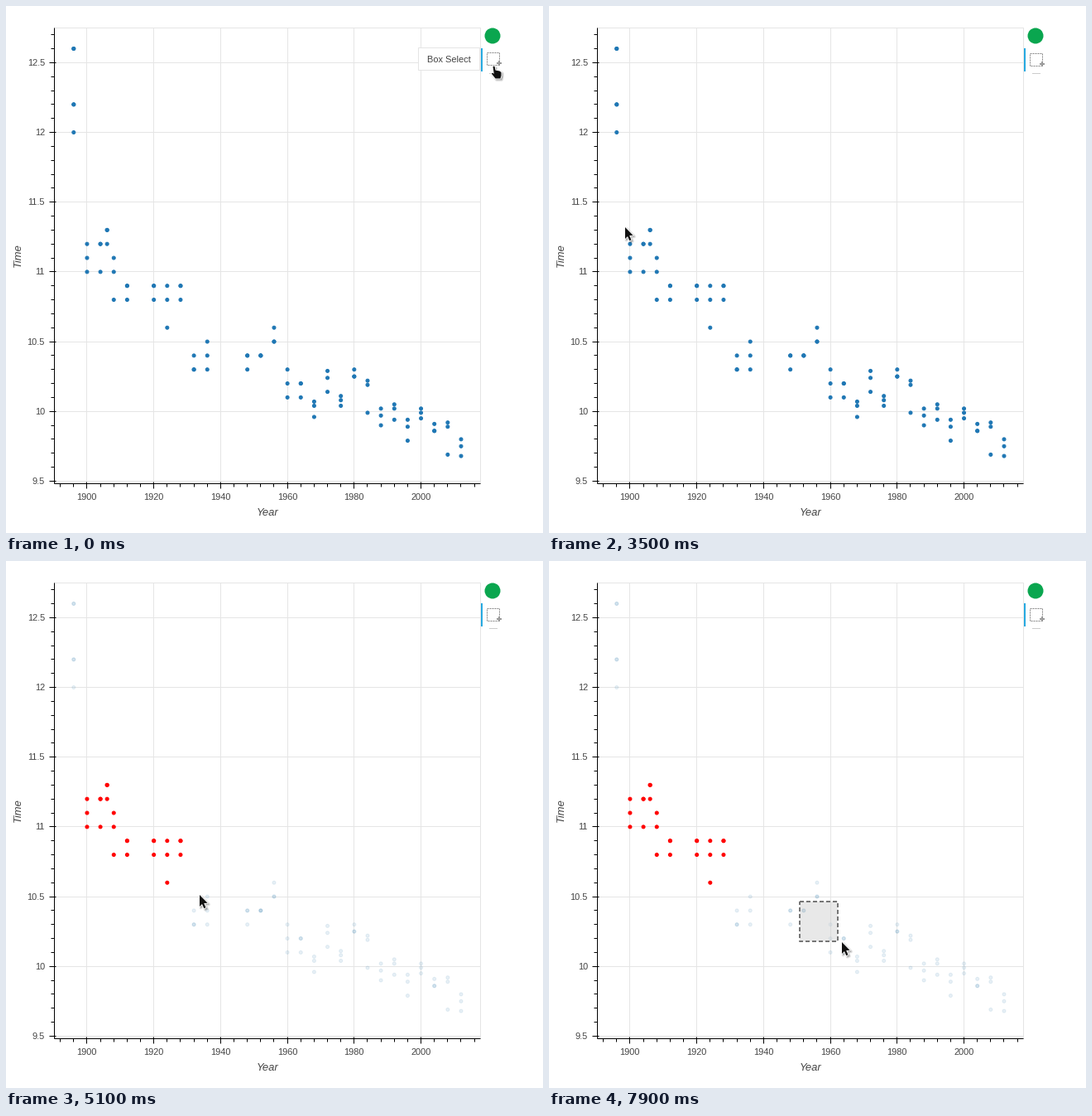
A matplotlib script for the animation above (8 s loop, 649 by 636 pixels).

```python
from itertools import cycle

import numpy as np
import matplotlib.pyplot as plt
from matplotlib.animation import FuncAnimation
from matplotlib.patches import Circle, Polygon, Rectangle

W, H, DPI = 649, 636, 64
PX = 72 / DPI  # points per pixel
LEFT, RIGHT, TOP, BOTTOM = 58.5, 573.5, 26.5, 576.5
INK, GRID, BLUE = "#444444", "#e5e5e5", "#1f77b4"

plt.rcParams["font.family"] = "Liberation Sans"
plt.rcParams["path.snap"] = False
fig = plt.figure(figsize=(W / DPI, H / DPI), dpi=DPI, facecolor="white")
ax = fig.add_axes([0, 0, 1, 1])
ax.set(xlim=(0, W), ylim=(H, 0))
ax.axis("off")


def year_x(year):
    return 58.4 + (year - 1890.2) * 515 / 127.6


def time_y(time):
    return TOP + (12.7485 - time) * 550 / 3.267


def crisp(v):
    return np.floor(v) + 0.5


def line(x0, y0, x1, y1, color="black", z=3, width=1):
    return ax.plot([x0, x1], [y0, y1], color=color, lw=width * PX, zorder=z,
                   solid_capstyle="butt")[0]


def dashed(color, width, z, on, off):
    return ax.plot([], [], color=color, lw=width * PX, zorder=z,
                   dashes=(on / width, off / width), dash_capstyle="butt")[0]


def label(x, y, text, size=11, **kw):
    kw = {"ha": "center", "va": "baseline", "color": INK, "zorder": 6, **kw}
    return ax.text(x, y, text, fontsize=size * PX, **kw)


def box(x0, y0, x1, y1, z, **kw):
    return ax.add_patch(Rectangle((x0, y0), x1 - x0, y1 - y0, zorder=z, **kw))


# Plot frame, grid, ticks and labels
box(LEFT, TOP, RIGHT, BOTTOM, 1, fc="white", ec=GRID, lw=PX)
for year in range(1892, 2017, 4):
    x = crisp(year_x(year))
    if year % 20:
        line(x, BOTTOM, x, BOTTOM + 4)
    else:
        line(x, TOP, x, BOTTOM, GRID, 1)
        line(x, BOTTOM - 2, x, BOTTOM + 6)
        label(x, 596, str(year))
for tenth in range(95, 128):
    y = crisp(time_y(tenth / 10))
    if tenth % 5:
        line(LEFT - 4, y, LEFT, y)
    else:
        line(LEFT, y, RIGHT, y, GRID, 1)
        line(LEFT - 6, y, LEFT + 2, y)
        label(47, y + 3.5, f"{tenth / 10:g}", ha="right")
line(LEFT, TOP, LEFT, BOTTOM)
line(LEFT, BOTTOM, RIGHT, BOTTOM)
label(316, 615, "Year", 13, style="italic")
label(15, 301, "Time", 13, style="italic", rotation=90, va="center")


def podiums():
    """Three times per games: second place, and gaps that repeat by era."""
    games = [y for y in range(1896, 2013, 4) if y not in (1916, 1940, 1944)]
    games = sorted(games + [1906])
    seconds = [12.2, 11.1, 11.2, 11.3, 11, 10.9, 10.9, 10.8, 10.9, 10.3,
               10.4, 10.4, 10.4, 10.5, 10.2, 10.2, 10.04, 10.24, 10.08, 10.25,
               10.19, 9.97, 10.02, 9.89, 9.99, 9.86, 9.89, 9.75]
    early = cycle([.2, .1, .2, .1, .2, .1, .1]), cycle([0, .1, 0])
    middle = cycle([0, .1, .1, 0]), cycle([.1, .1, 0, 0])
    late = cycle([.08, .1, .04, 0, .2, .07]), cycle([.03, .05])
    rows = [(1896, 12.6)] * 2
    for year, second in zip(games, seconds):
        lead, trail = early if year < 1930 else middle if year < 1966 else late
        rows += [(year, second - next(lead)), (year, second),
                 (year, second + next(trail))]
    return np.array(rows).T


years, times = podiums()
chosen = (years >= 1900) & (years <= 1928)
points = ax.scatter(year_x(years), time_y(times), s=(4 * PX) ** 2,
                    c=BLUE, edgecolors=BLUE, linewidths=PX, zorder=2)
plain_colors = [BLUE] * len(years)
picked_colors = [(1, 0, 0, 1) if c else (0.12, 0.45, 0.66, 0.1) for c in chosen]

# Toolbar
ax.add_patch(Circle((588, 36), 9.5, fc="#0aa64f", lw=0, zorder=4))
bar = box(574, 51, 576, 79, 4, fc="#26aae1", lw=0)
line(584, 81.5, 594, 81.5, "#cccccc", 4)
icon = dashed("#888888", 1, 4, 2, 1)
plus = [line(0, 0, 0, 0, "#999999", 4, 2) for _ in range(2)]
tooltip = [box(498.5, 50.5, 572.5, 77.5, 5, fc="white", ec=GRID, lw=PX),
           label(535.5, 68, "Box Select")]

# Selection rectangle
fill = box(0, 0, 1, 1, 7, fc="lightgrey", alpha=0.5, lw=0)
outline = dashed("#767676", 2, 7, 5, 3)


class Pointer:
    """Black shape with a white rim and a soft shadow."""

    def __init__(self, shape):
        self.shape = np.array(shape, float)
        self.layers = []
        for width in (4, 2.5, 1):
            self.add((1.5, 1.6), width, "black", "black", 0.08)
        self.add((0, 0), 1.8, "white", "white", 1)
        self.add((0, 0), 0, "#111111", "none", 1)

    def add(self, shift, width, face, edge, alpha):
        patch = Polygon(self.shape, fc=face, ec=edge, lw=width * PX,
                        alpha=alpha, joinstyle="round", zorder=9)
        self.layers.append((ax.add_patch(patch), np.array(shift)))

    def place(self, tip, visible):
        for patch, shift in self.layers:
            patch.set_xy(self.shape + shift + tip)
            patch.set_visible(visible)


arrow = Pointer([(1, 1), (1, 15), (4, 12), (6.3, 17.2), (8.5, 16.2),
                 (6.2, 11), (10.6, 10.8)])
hand = Pointer([(0, 0.8), (1, 0), (2.1, 0.6), (3, 5), (8, 6), (10, 7.5),
                (10, 11.5), (9, 15), (3, 15), (-1.8, 9), (-0.4, 8.2),
                (1.3, 9.4)])

# Pointer stops: tenths of a second, x, y
STOPS = np.array([(30, 168, 298), (35, 91, 266), (39, 91, 266),
                  (42, 169, 366), (45, 203, 386), (46, 203, 386),
                  (49, 233, 402), (64, 233, 402), (70, 302, 409),
                  (76, 302, 409), (79, 353, 459)])


def pointer_at(step):
    when, xs, ys = STOPS.T
    return np.array([np.interp(step, when, xs), np.interp(step, when, ys)])


def loop(x0, y0, x1, y1):
    return [x0, x1, x1, x0, x0], [y0, y0, y1, y1, y0]


def draw(step):
    on_toolbar = step < 28
    hand.place((588.5, 72.5), on_toolbar)
    arrow.place(pointer_at(step), not on_toolbar)
    for part in tooltip:
        part.set_visible(on_toolbar)

    bar.set_visible(not 13 <= step < 21)
    y = 69 if step < 13 else 70
    icon.set_data(loop(581.5, y - 12.5, 596.5, y + 2.5))
    plus[0].set_data([593, 599], [y, y])
    plus[1].set_data([596, 596], [y - 3, y + 3])

    colors = picked_colors if step >= 51 else plain_colors
    points.set_facecolor(colors)
    points.set_edgecolor(colors)

    dragging = 40 <= step <= 50 or step >= 77
    fill.set_visible(dragging)
    outline.set_visible(dragging)
    x0, y0 = pointer_at(39 if step < 60 else 76) + (1, 2)
    # The dragged corner trails slightly behind the pointer
    x1, y1 = np.round(pointer_at(step - 0.2) + (-1, 3))
    fill.set_bounds(x0, y0, x1 - x0, y1 - y0)
    outline.set_data(loop(x0, y0, x1, y1))
    return []


anim = FuncAnimation(fig, draw, frames=80, interval=100, init_func=lambda: [],
                     repeat=True, repeat_delay=0, blit=False)
plt.show()
```
